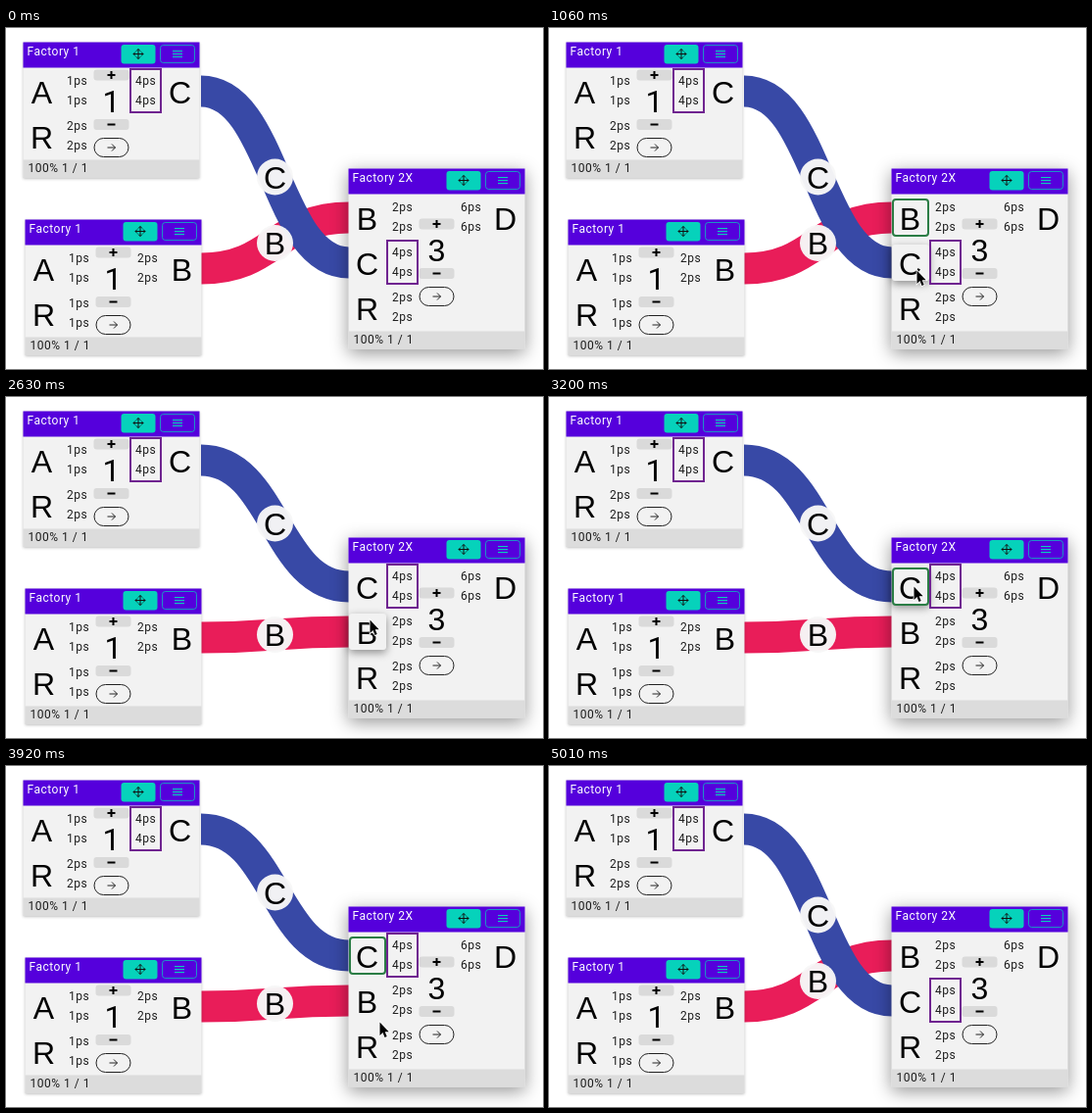
Recreate the animation shown at these times as an HTML page with a canvas. Size 548 by 348 pixels, loop 5.09 s.

```html
<!DOCTYPE html>
<html lang="en">
<head>
<meta charset="utf-8">
<title>Factory graph</title>
<style>
  html, body { margin: 0; width: 100%; height: 100%; overflow: hidden; background: #fff; }
  canvas { display: block; }
</style>
</head>
<body>
<canvas id="stage" width="548" height="348"></canvas>
<script>
const ctx = document.getElementById('stage').getContext('2d');
const LOOP = 5090, STEP = 80, ROW = 46;
const TEAL = '#06d2bb', PANEL = '#f2f2f2', INK = '#000';

// Pointer moves: start time, number of steps, destination
const START = [388, 250];
const MOVES = [
  [80, 7, 372, 193],
  [900, 3, 375, 247],
  [1140, 4, 375, 285],
  [1800, 2, 368, 262],
  [2470, 3, 371, 227],
  [2710, 4, 372, 193],
  [3280, 9, 381, 261],
  [4930, 1, 377, 285],
];

function pointerAt(t) {
  let [x, y] = START;
  for (const [start, steps, toX, toY] of MOVES) {
    if (t < start) break;
    const p = Math.min(1, (Math.floor((t - start) / STEP) + 1) / steps);
    x += (toX - x) * p;
    y += (toY - y) * p;
  }
  return { x, y, visible: t >= 80 && t < 5010 };
}

function box(x, y, w, h, { fill, stroke, line = 1, r = 0 }) {
  ctx.beginPath();
  ctx.roundRect(x, y, w, h, r);
  if (fill) { ctx.fillStyle = fill; ctx.fill(); }
  if (stroke) { ctx.strokeStyle = stroke; ctx.lineWidth = line; ctx.stroke(); }
}

function raised(x, y, w, h, r, drop, blur, alpha) {
  ctx.save();
  ctx.shadowColor = `rgba(0,0,0,${alpha})`;
  ctx.shadowOffsetY = drop;
  ctx.shadowBlur = blur;
  box(x, y, w, h, { fill: PANEL, r });
  ctx.restore();
}

function strokePath(d, x, y, color = INK, width = 1) {
  ctx.save();
  ctx.translate(x, y);
  ctx.strokeStyle = color;
  ctx.lineWidth = width;
  ctx.stroke(new Path2D(d));
  ctx.restore();
}

function small(s, x, y, color = '#1c1c1c') {
  ctx.font = '12px Roboto, sans-serif';
  ctx.letterSpacing = '0.5px';
  ctx.textAlign = 'left';
  ctx.fillStyle = color;
  ctx.fillText(s, x, y);
}

function big(s, x, y, family = '"Liberation Sans", Arial') {
  ctx.font = `32px ${family}, sans-serif`;
  ctx.letterSpacing = '0px';
  ctx.textAlign = 'center';
  ctx.fillStyle = INK;
  ctx.fillText(s, x, y);
}

function rate(n, x, cy, framed) {
  small(n + 'ps', x, cy - 6);
  small(n + 'ps', x, cy + 14);
  if (framed) box(x - 5, cy - 22, 31, 44, { stroke: '#6f2490', line: 2 });
}

function link(y1, y2, color) {
  ctx.beginPath();
  ctx.moveTo(199, y1);
  ctx.bezierCurveTo(274.5, y1, 274.5, y2, 350, y2);
  ctx.strokeStyle = color;
  ctx.lineWidth = 32;
  ctx.stroke();
}

function badge(letter, y) {
  ctx.beginPath();
  ctx.arc(274.5, y, 18.5, 0, 7);
  ctx.fillStyle = 'rgba(247,247,247,.97)';
  ctx.fill();
  big(letter, 274.5, y + 11.5);
}

// inputs: [letter, rate, framed, hovered, selected]; output: [letter, rate, framed]
function card(x, y, title, count, inputs, output, lifted) {
  const bottom = y + 28.5 + inputs.length * ROW;
  const shift = (inputs.length - 2) * ROW / 2;
  const left = x - 0.5, top = y + 0.5;
  raised(left, top, 180, bottom + 18.5 - top, 1, lifted ? 4 : 1, lifted ? 18 : 3, lifted ? .42 : .25);
  box(left, top, 180, 26, { fill: '#5500dc' });
  box(left, bottom, 180, 18.5, { fill: '#dcdcdc' });
  small(title, x + 3.5, y + 14, '#fff');
  small('100% 1 / 1', x + 4.5, Math.floor(bottom) + 13);

  box(x + 99.5, y + 3, 35, 19.5, { fill: TEAL, r: 3 });
  strokePath('M-5 0H5M0-5V5M-3-2L-5 0L-3 2M3-2L5 0L3 2M-2-3L0-5L2-3M-2 3L0 5L2 3', x + 117, y + 12.5, '#111');
  box(x + 139.5, y + 3.5, 35, 18, { stroke: 'rgba(6,210,187,.7)', r: 3 });
  strokePath('M-5-3H5M-5 0H5M-5 3H5', x + 157, y + 12.5, TEAL);

  const mid = x + 89.5, py = y + shift;
  box(mid - 18, py + 28.5, 36, 11, { fill: '#dadada', r: 3 });
  strokePath('M-4 0H4M0-4V4', mid, py + 34, INK, 2);
  big(count, mid, py + 72, count === 1 ? 'Roboto' : undefined);
  box(mid - 18, py + 79, 36, 11, { fill: '#dadada', r: 3 });
  strokePath('M-4 0H4', mid, py + 84.5, INK, 2);
  box(mid - 17.5, py + 98.5, 35, 19, { stroke: '#222', r: 9.5 });
  strokePath('M-4 0H4M0.5-3.5L4 0L0.5 3.5', mid, py + 108, '#222');

  inputs.forEach(([letter, n, framed, hovered, selected], i) => {
    const cy = y + 50 + i * ROW;
    if (hovered) raised(x, cy - 18, 38, 37, 3, 3, 9, .42);
    if (selected) box(x + 1, cy - 18, 36, 37, { stroke: '#2b7d45', line: 2, r: 3 });
    big(letter, x + 18.5, cy + 13);
    rate(n, x + 44, cy, framed);
  });
  const [letter, n, framed] = output;
  rate(n, x + 114, y + 50, framed);
  big(letter, x + 159.5, y + 63);
}

function pointer(x, y) {
  const arrow = new Path2D('M0 0V13.5L3 10.6L5 15.5L7.2 14.6L5.2 9.8H9.2Z');
  ctx.save();
  ctx.translate(x + 0.5, y + 0.5);
  ctx.strokeStyle = '#fff';
  ctx.lineWidth = 1.6;
  ctx.stroke(arrow);
  ctx.fillStyle = INK;
  ctx.fill(arrow);
  ctx.restore();
}

function draw(t) {
  const mouse = pointerAt(t);
  const swapped = t >= 2220 && t < 4510;
  const selected = t >= 730 && t < 2220 ? 'B' : t >= 3200 && t < 4510 ? 'C' : '';
  const order = swapped ? 'CBR' : 'BCR';
  const rowY = letter => 193.5 + ROW * order.indexOf(letter);
  const inputs = [...order].map(letter => [
    letter,
    letter === 'C' ? 4 : 2,
    letter === 'C',
    mouse.visible && mouse.x < 388 && Math.abs(mouse.y - rowY(letter)) < 19,
    letter === selected,
  ]);

  ctx.fillStyle = '#fff';
  ctx.fillRect(0, 0, 548, 348);
  link(245.5, rowY('B'), '#e91d59');
  link(64.5, rowY('C'), '#3849a6');
  badge('C', (64.5 + rowY('C')) / 2);
  badge('B', (245.5 + rowY('B')) / 2);
  card(18, 14, 'Factory 1', 1, [['A', 1], ['R', 2]], ['C', 4, true]);
  card(20, 195, 'Factory 1', 1, [['A', 1], ['R', 1]], ['B', 2]);
  card(350, 143, 'Factory 2X', 3, inputs, ['D', 6], true);
  if (mouse.visible) pointer(mouse.x, mouse.y);
}

const origin = performance.now();
function frame() {
  draw((performance.now() - origin) % LOOP);
  requestAnimationFrame(frame);
}
frame();
</script>
</body>
</html>
```
